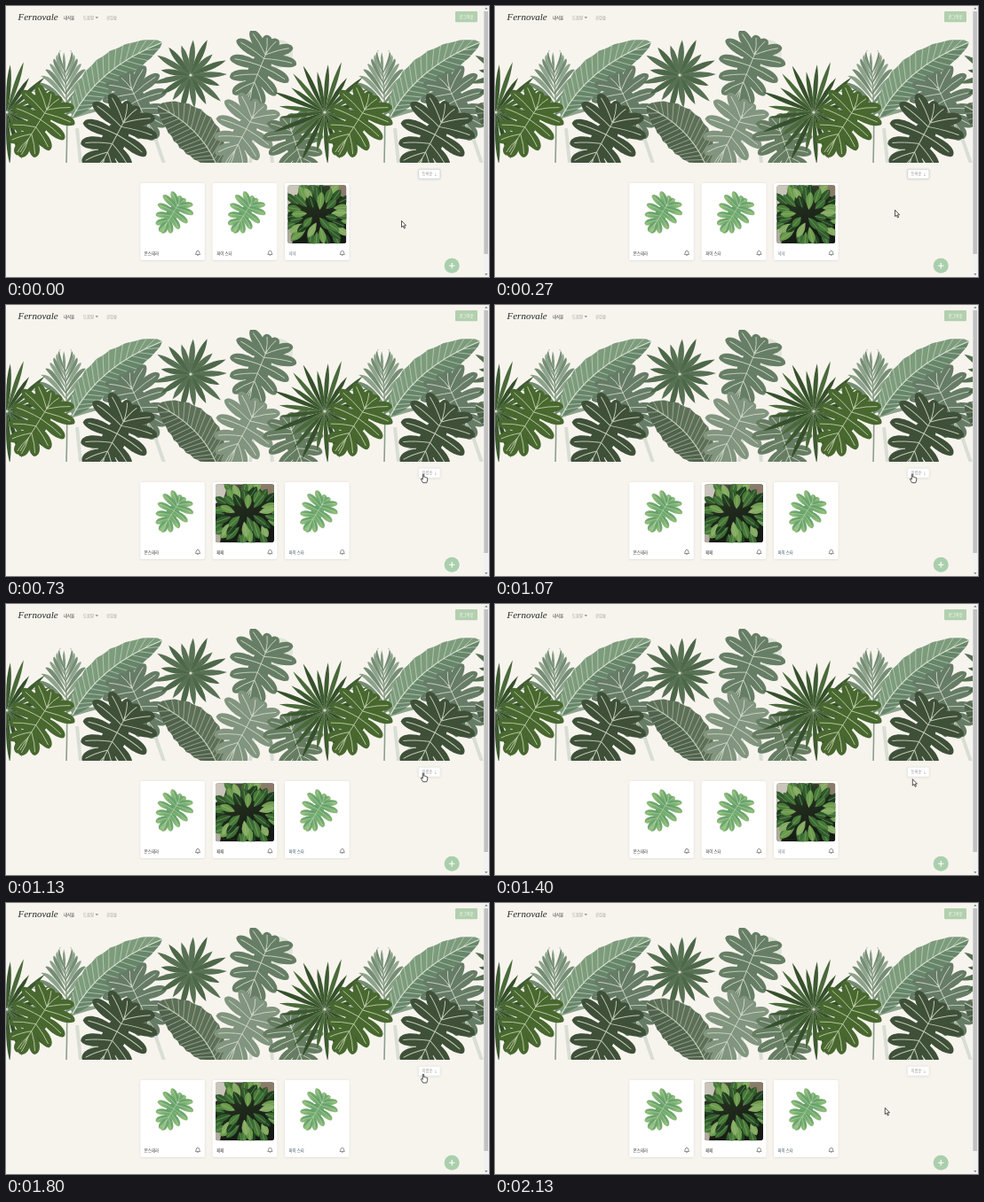
Recreate the animation shown at these times as an HTML page. Size 544 by 306 pixels, loop 2190 ms.

```html
<!DOCTYPE html>
<html lang="ko">
<head>
<meta charset="utf-8">
<style>
html, body { margin: 0; height: 100%; overflow: hidden; background: #f7f4ee; }
svg { display: block; width: 100vw; height: 100vh; }
text { font: 4.4px "Noto Sans CJK KR", "Noto Sans CJK", "Noto Sans", sans-serif; fill: #333; }
.brand { font: italic 11px "Liberation Serif", "Noto Serif", serif; fill: #262b26; }
</style>
</head>
<body>
<svg id="stage" viewBox="0 0 544 306"></svg>
<script>
const LOOP = 2190, STEP = 200 / 3, TILE = 358;
const rad = Math.PI / 180;
let seed = 7;
const rnd = () => (seed = seed * 16807 % 2147483647) / 2147483647;
const range = (n, f) => Array.from({ length: n }, (_, i) => f(i)).join('');

// Split leaf: stem joint at 0,0, tip at 0,102
function monsteraDef() {
  const lobes = [[2, 165, 34], [3, 129, 50], [10, 104, 58], [24, 84, 56], [40, 65, 49], [55, 43, 43], [66, 10, 36]];
  let blade = '<ellipse cy="35" rx="19" ry="38"/>', veins = '<path d="M0 -4V94"/>';
  for (const s of [1, -1]) for (const [y, a, l] of lobes) {
    const at = `transform="scale(${s} 1) translate(0 ${y}) rotate(${90 - a})"`;
    blade += `<path ${at} d="M0 0C${l * .2} -13 ${l * 1.02} -14 ${l} 3C${l * .9} 13 ${l * .2} 13 0 0"/>`;
    veins += `<path ${at} d="M0 0Q${l * .5} -2 ${l * .86} 1"/>`;
  }
  return `<g id="monstera"><g stroke="none">${blade}</g><g fill="none">${veins}</g></g>`;
}

// x, y mark the middle of the leaf
const monstera = (x, y, size, turn, fill, vein = '#d3dac8', line = 1.3) =>
  `<use href="#monstera" fill="${fill}" stroke="${vein}" stroke-width="${line}"
    transform="translate(${x} ${y}) rotate(${turn}) scale(${size}) translate(0 -33)"/>`;

function banana(x0, y0, cx, cy, x1, y1, w, light, dark, vein) {
  const spine = t => {
    const u = 1 - t;
    return [u * u * x0 + 2 * u * t * cx + t * t * x1, u * u * y0 + 2 * u * t * cy + t * t * y1];
  };
  const edge = (t, s) => {
    const [x, y] = spine(t), dx = (1 - t) * (cx - x0) + t * (x1 - cx), dy = (1 - t) * (cy - y0) + t * (y1 - cy);
    const r = s * w * Math.sin(Math.PI * t) ** .6 * (1 - .06 * Math.abs(Math.sin(t * 25))) / Math.hypot(dx, dy);
    return [x - dy * r, y + dx * r];
  };
  const half = (s, fill) =>
    `<path fill="${fill}" d="M${x0} ${y0}${range(41, i => 'L' + edge(i / 40, s))}Q${cx} ${cy} ${x0} ${y0}"/>`;
  const ribs = range(15, i => {
    const t = .06 + i * .057;
    return [1, -1].map(s => `M${spine(t)}L${edge(Math.min(t + .1, .98), s)}`).join('');
  });
  return half(-1, light) + half(1, dark) +
    `<path fill="none" stroke="${vein}" stroke-width=".6" d="${ribs}"/>
     <path fill="none" stroke="${vein}" stroke-width="1.3" d="M${x0} ${y0}Q${cx} ${cy} ${x1} ${y1}"/>`;
}

const blade = (x, y, turn, l, w, fill) =>
  `<path fill="${fill}" transform="translate(${x} ${y}) rotate(${turn})" d="M0 0Q${l * .6} ${-w} ${l} 0Q${l * .6} ${w} 0 0"/>`;

const fan = (x, y, n, len, w, fills) =>
  range(n, i => blade(x, y, i * 360 / n - 86, len * (.9 + .13 * Math.sin(i * 2.3)), w, fills[i % fills.length])) +
  `<circle cx="${x}" cy="${y}" r="1.6" fill="#d5dcc9"/>`;

const palm = () =>
  '<path d="M68 178Q70 110 66 72" fill="none" stroke="#8ba08a" stroke-width="1.6"/>' +
  blade(66, 78, -92, 26, 3, '#829a82') +
  range(10, i => [1, -1].map(s => {
    const y = 74 + i * 6, l = 25 + i * 2.6, a = (-78 + i * 7) * rad;
    const ex = 67 + s * l * Math.cos(a), ey = y + l * Math.sin(a);
    return `<path fill="${i % 2 ? '#8da38b' : '#748d74'}" d="M67 ${y}Q${67 + s * l * .4} ${ey - 2} ${ex} ${ey + 1}Q${67 + s * l * .55} ${ey + 5} 67 ${y + 2}"/>`;
  }).join(''));

const tile = () =>
  '<circle cx="307" cy="54" r="16" fill="#dfe5d8"/>' +
  '<path d="M80 138L84 177L108 152M280 140L275 178M297 140L300 178M165 140L178 178" fill="none" stroke="#d9ded5" stroke-width="4"/>' +
  palm() +
  banana(75, 125, 103, 70, 176, 41, 20, '#7c9c7c', '#66866a', '#d8e0cf') +
  monstera(150, 112, .62, -25, '#667c66') +
  fan(208, 78, 17, 44, 6.5, ['#587154', '#4d6749']) +
  monstera(285, 73, .64, 22, '#667e65') +
  banana(239, 184, 222, 138, 171, 113, 25, '#4f624c', '#5c7057', '#c3ccb7') +
  monstera(268, 144, .64, 28, '#81957f') +
  monstera(327, 158, .58, -18, '#667d63');

const front = () =>
  fan(1, 120, 25, 60, 5, ['#3d5a31', '#4a6a3a', '#35502b']) +
  monstera(36, 133, .62, 32, '#48682f', '#c7d2b1') +
  monstera(122, 151, .72, 28, '#3f5039', '#c4ccb8');

const banner = () =>
  `<g clip-path="url(#banner)"><g id="tile">${tile()}</g><use href="#tile" x="${TILE}"/>
   <g id="front">${front()}</g><use href="#front" x="${TILE}"/></g>`;

const greens = ['#2f5a2b', '#477a38', '#6a9a4c', '#3b6b33', '#84ab62', '#1f4020'];
const photo = () =>
  `<g clip-path="url(#photo)"><rect width="66" height="66" fill="url(#shade)"/>
   <path d="M0 0H14L9 17L0 22Z" fill="#c9c5bb"/><path d="M46 0H66V15L54 10Z" fill="#8a7b69"/><path d="M0 44L8 50L5 66H0Z" fill="#b2aaa0"/>
   ${range(46, i => {
     const a = i * 137.5, r = 29 * Math.sqrt(1 - i / 46), l = 14 + rnd() * 7;
     const x = 34 + r * Math.cos(a * rad), y = 33 + r * .88 * Math.sin(a * rad), turn = a + rnd() * 50 - 25;
     return blade(x, y, turn, l, 8, greens[i % 6]) +
       `<path transform="translate(${x} ${y}) rotate(${turn})" d="M1 0H${l - 2}" stroke="#a9c58c" stroke-width=".4"/>`;
   })}</g>`;

const label = (x, y, s, fill = '#333', extra = '') => `<text x="${x}" y="${y}" fill="${fill}" style="fill:${fill}" ${extra}>${s}</text>`;

const frame = x =>
  `<rect x="${x}" y="200" width="72.5" height="87" rx="2" fill="#fff" filter="url(#soft)"/>
   <path transform="translate(${x + 64.7} 279)" d="M-2.6 1.6C-1.7.8-2.2-2.7 0-2.7S1.7.8 2.6 1.6ZM-.8 2.2Q0 3.2.8 2.2" fill="none" stroke="#444" stroke-width=".6"/>`;

const leafCard = (x, name, fill) =>
  monstera(x + 36, 235, .355, 32, 'url(#wash)', '#d5e6bd', 1.2) + label(x + 4.5, 280.5, name, fill);
const photoCard = (x, fill) =>
  `<g transform="translate(${x + 3.3} 202.3)">${photo()}</g>` + label(x + 4.5, 280.5, '페페', fill);

const X = [151.3, 232.7, 314];
stage.innerHTML = `<defs>
  <clipPath id="banner"><path d="M0 28H538V177H0Z"/></clipPath>
  <clipPath id="photo"><rect width="66" height="66" rx="3"/></clipPath>
  <linearGradient id="shade" x2=".4" y2="1"><stop stop-color="#6b6355"/><stop offset=".35" stop-color="#24301f"/><stop offset="1" stop-color="#151a14"/></linearGradient>
  <linearGradient id="wash" x2="1" y2="1"><stop stop-color="#58976a"/><stop offset=".55" stop-color="#76ad70"/><stop offset="1" stop-color="#a4c982"/></linearGradient>
  <filter id="soft" x="-10%" y="-20%" width="120%" height="140%"><feDropShadow dx="0" dy=".4" stdDeviation=".8" flood-opacity=".13"/></filter>
  ${monsteraDef()}</defs>
  <rect width="544" height="306" fill="#f7f4ee"/>
  <text class="brand" x="13.5" y="16.3" textLength="">Fernovale</text>
  ${label(65, 14.6, '내식물')}${label(87, 14.6, '도움말', '#999')}${label(113, 14.6, '공감숲', '#999')}
  <path d="M100.5 12.3H104L102.25 14.3Z" fill="#888"/>
  <rect x="506" y="6" width="25" height="12.2" rx="1.2" fill="#b2d0ae"/>
  ${label(518.5, 13.8, '로그아웃', '#fff', 'text-anchor="middle" font-weight="700"')}
  ${banner()}
  <rect id="box" x="464.7" y="184.3" width="24.3" height="10.8" rx="1.4" fill="#fff" filter="url(#soft)" stroke-width=".7"/>
  <text id="sort" x="468.5" y="191.4" style="fill:#999"></text>
  ${X.map(frame).join('')}${leafCard(X[0], '몬스테라')}
  <g id="listA">${leafCard(X[1], '파이 스타')}${photoCard(X[2], '#8c95a3')}</g>
  <g id="listB">${photoCard(X[1])}${leafCard(X[2], '파이 스타', '#36505a')}</g>
  <circle cx="502.2" cy="293.2" r="8.5" fill="#aacfac"/>
  <path d="M499 293.2H505.4M502.2 290V296.4" stroke="#fff" stroke-width="1.1"/>
  <rect x="538" width="6" height="306" fill="#f1f1f1"/><rect x="538.4" y="6" width="4.6" height="274" fill="#c1c1c1"/>
  <path d="M539.3 3.6H542.5L540.9 1.8ZM539.3 302.3H542.5L540.9 304.1Z" fill="#666"/>
  <g id="cursor" stroke="#111" stroke-width=".7" stroke-linejoin="round" fill="#fff">
    <path id="arrow" d="M0 0V7.3L1.7 5.8L2.9 8.6L4.1 8.1L2.9 5.4H5.1Z"/>
    <path id="hand" d="M-.7.6Q0-.5.7.6V3.6Q1.5 3 2.1 3.9Q2.9 3.3 3.5 4.2Q4.7 3.9 4.7 5.1V7.3L3.8 10H-.3L-2.5 6.4Q-2.6 5.2-1.6 5.5L-.7 6.4Z"/>
  </g>`;

const $ = id => document.getElementById(id);
const show = (id, on) => $(id).style.display = on ? '' : 'none';
// time, x, y of the pointer tip
const path = [[0, 445.5, 242.5], [130, 446, 241.5], [470, 457, 214.5], [600, 468, 194], [730, 470, 190.7], [1130, 470, 190.7],
  [1270, 470, 192], [1400, 470.3, 197.7], [1530, 471, 196], [1670, 471.2, 191.8], [1800, 470, 193], [2130, 439.3, 231.3], [LOOP, 439.3, 231.3]];

function pointer(t) {
  const i = path.findIndex(p => p[0] > t), [t0, x0, y0] = path[i - 1], [t1, x1, y1] = path[i];
  const u = (t - t0) / (t1 - t0);
  return [x0 + (x1 - x0) * u, y0 + (y1 - y0) * u];
}

function draw(now) {
  const k = Math.floor((now % LOOP + 4) / STEP) % 33;
  const t = Math.round(k * STEP / 10) * 10;
  const [x, y] = pointer(t), over = y < 195.5;
  const byName = t >= 670 && t < 1200 || t >= 1730;
  show('listA', !byName);
  show('listB', byName);
  $('sort').textContent = byName ? '이름순 ↓' : '등록순 ↓';
  $('box').setAttribute('stroke', t < 600 ? '#c3cbc8' : '#e6e9e4');
  $('cursor').setAttribute('transform', `translate(${x} ${y})`);
  show('arrow', !over);
  show('hand', over);
  requestAnimationFrame(draw);
}
draw(performance.now());
</script>
</body>
</html>
```
